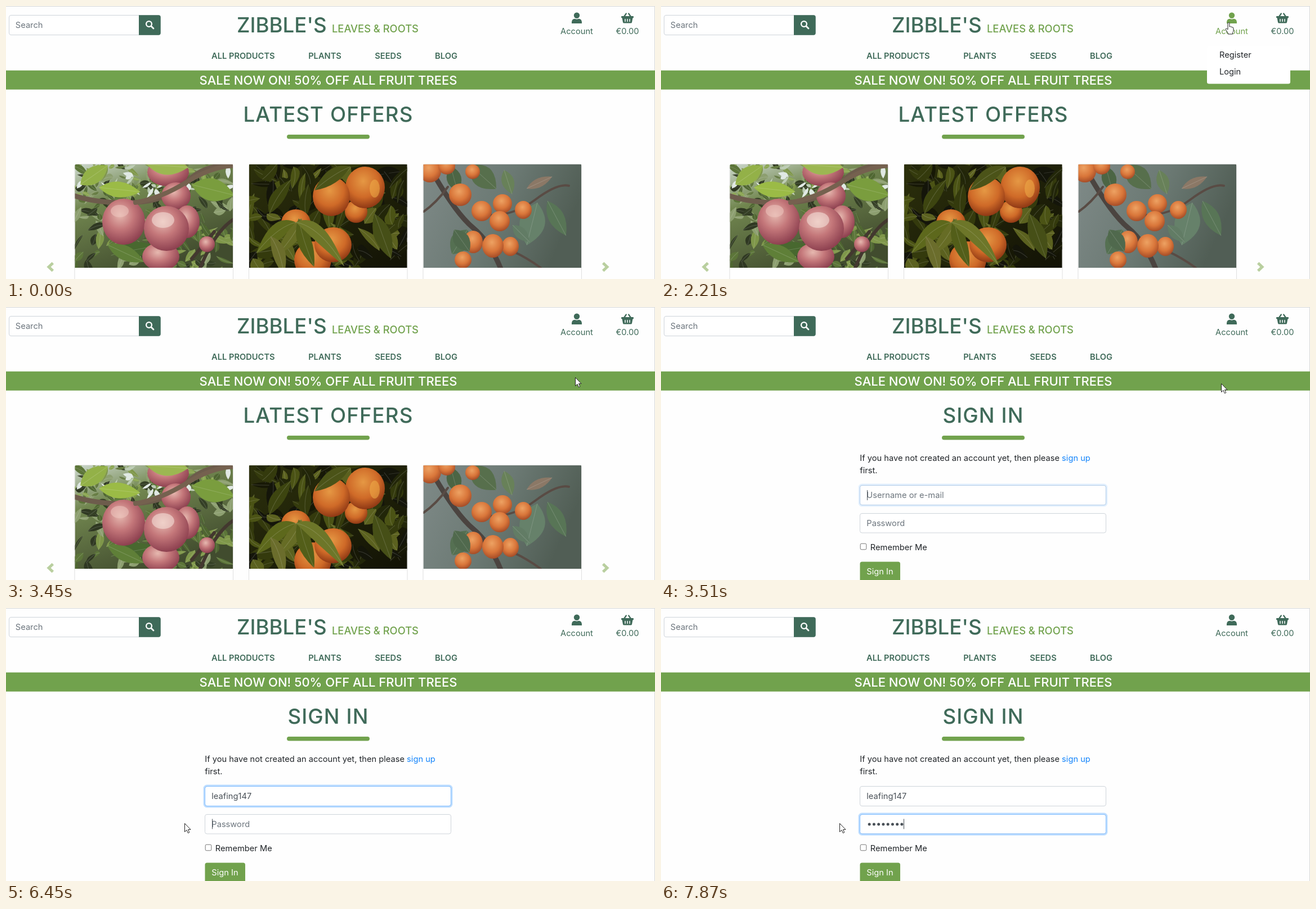
These frames come from a looping animation (1153 by 486 pixels, 8000 ms). An HTML page:

```html
<!DOCTYPE html>
<html lang="en">
<head>
<meta charset="utf-8">
<title>Shop sign in</title>
<style>
  html, body { margin: 0; width: 100%; height: 100%; overflow: hidden; background: #fefefe; }
  #stage { display: block; width: 1153px; height: 486px; font: 400 14.67px Inter, sans-serif; font-optical-sizing: none; fill: #212529; }
  .dark { fill: #3f6a59; color: #3f6a59; }
  .green { fill: #71a24d; }
  .mid { text-anchor: middle; }
  .nav { font-weight: 600; }
  .head { font-weight: 500; }
  .title { font-size: 36.67px; letter-spacing: 1.1px; }
  .hint { fill: #6c757d; }
  .typed { fill: #495057; }
  .box { fill: #fff; stroke: #ced4da; }
  .glow { fill: none; stroke: #bfdeff; stroke-width: 3; }
  .card { fill: #fff; stroke: #dfdfdf; }
  .line { fill: none; stroke-linecap: round; }
</style>
</head>
<body>
<svg id="stage" viewBox="0 0 1153 486">
  <defs>
    <radialGradient id="plum" cx=".42" cy=".35" r=".7"><stop stop-color="#e6b9b0"/><stop offset=".45" stop-color="#c4777a"/><stop offset="1" stop-color="#86394a"/></radialGradient>
    <radialGradient id="peach" cx=".45" cy=".35" r=".7"><stop stop-color="#e59844"/><stop offset=".55" stop-color="#cf6a28"/><stop offset="1" stop-color="#832f11"/></radialGradient>
    <radialGradient id="apricot" cx=".45" cy=".35" r=".7"><stop stop-color="#eda263"/><stop offset=".55" stop-color="#d9763a"/><stop offset="1" stop-color="#9c4524"/></radialGradient>
    <linearGradient id="orchard" x2=".5" y2="1"><stop stop-color="#ccd8cc"/><stop offset=".35" stop-color="#71864f"/><stop offset="1" stop-color="#414c2e"/></linearGradient>
    <linearGradient id="night" x2="1" y2="1"><stop stop-color="#2c300c"/><stop offset="1" stop-color="#121205"/></linearGradient>
    <linearGradient id="mist" x2="1" y2=".3"><stop stop-color="#7f8a88"/><stop offset=".55" stop-color="#6b7973"/><stop offset="1" stop-color="#515e55"/></linearGradient>
  </defs>

  <path d="M0 .5H1152.5V486" fill="none" stroke="#d5d7d8"/>

  <!-- Header -->
  <rect class="box" x="5.5" y="16.5" width="269" height="35" rx="3.5"/>
  <path class="dark" d="M236 16.300H271Q274.700 16.300 274.700 20V48Q274.700 51.700 271 51.700H236Z"/>
  <g class="line" stroke="#fff" stroke-width="2.300"><circle cx="254" cy="32" r="4.900"/><path d="M258 36L262 40" stroke-width="2.800"/></g>
  <text class="hint" x="16.800" y="39.300">Search</text>
  <text class="dark head" x="410" y="47" font-size="36.670">ZIBBLE'S</text>
  <text class="green head" x="579" y="47" font-size="18.330">LEAVES &amp; ROOTS</text>
  <g id="account" class="dark" style="fill: currentColor">
    <circle cx="1014" cy="16.700" r="5.200"/>
    <path d="M1005 31Q1004.600 22.800 1010.500 22.800Q1014 24.400 1017.500 22.800Q1023.400 22.800 1023 31Z"/>
    <text class="mid" x="1014" y="49.500">Account</text>
  </g>
  <g class="dark">
    <path class="line" d="M1098 19L1101.800 13.500M1110 19L1106.200 13.500" stroke="#3f6a59" stroke-width="2.200"/>
    <rect x="1093" y="18" width="22" height="3.200" rx="1.200"/>
    <path d="M1094.500 21H1113.500L1112 29Q1111.700 30.500 1110 30.500H1098Q1096.300 30.500 1096 29Z"/>
    <path class="line" d="M1100 23.500V27.500M1104 23.500V27.500M1108 23.500V27.500" stroke="#fefefe" stroke-width="1.500"/>
    <text class="mid" x="1104" y="49.500">€0.00</text>
  </g>
  <g class="dark mid nav">
    <text x="421.300" y="94">ALL PRODUCTS</text><text x="566.500" y="94">PLANTS</text>
    <text x="679" y="94">SEEDS</text><text x="782" y="94">BLOG</text>
  </g>
  <rect class="green" y="114.700" width="1153" height="34"/>
  <text class="mid head" x="572.500" y="139.500" font-size="22" fill="#fff">SALE NOW ON! 50% OFF ALL FRUIT TREES</text>
  <rect class="green" x="499" y="229" width="147" height="7.400" rx="3.700"/>

  <g id="offers">
    <text class="title head dark mid" x="572.500" y="206">LATEST OFFERS</text>
    <g id="cards"></g>
    <path d="M83.300 457.500L76 464.500L83.300 471.500M1060.700 457.500L1068 464.500L1060.700 471.500" fill="none" stroke="#b9cf9f" stroke-width="5"/>
  </g>

  <g id="signin">
    <text class="title head dark mid" x="572.500" y="206">SIGN IN</text>
    <text x="353.300" y="274.300">If you have not created an account yet, then please <tspan fill="#1384fb">sign up</tspan></text>
    <text x="353.300" y="296.300">first.</text>
    <rect class="box" x="353.500" y="317.500" width="437" height="35" rx="3.500"/>
    <rect class="box" x="353.500" y="367.500" width="437" height="34.500" rx="3.500"/>
    <g id="userFocus"><rect class="glow" x="352" y="316" width="440" height="38" rx="5"/><rect class="line" x="353.500" y="317.500" width="437" height="35" rx="3.500" stroke="#80bdff"/></g>
    <g id="passFocus"><rect class="glow" x="352" y="366" width="440" height="37.500" rx="5"/><rect class="line" x="353.500" y="367.500" width="437" height="34.500" rx="3.500" stroke="#80bdff"/></g>
    <text id="userHint" class="hint" x="365.300" y="340.300">Username or e-mail</text>
    <text id="passHint" class="hint" x="365.300" y="389.800">Password</text>
    <text id="user" class="typed" x="365.300" y="340.300"></text>
    <g id="dots" class="typed"></g>
    <rect id="userCaret" class="typed" y="326" width="1" height="18"/>
    <rect id="passCaret" class="typed" y="375.500" width="1" height="18"/>
    <rect x="354.200" y="421.200" width="10.600" height="10.600" rx="2" fill="#fff" stroke="#767676"/>
    <text x="371.800" y="432.800">Remember Me</text>
    <rect class="green" x="353.500" y="453.500" width="71.500" height="36" rx="3.700"/>
    <text x="365.300" y="476.300" fill="#fff">Sign In</text>
  </g>

  <g id="menu">
    <rect x="970" y="72" width="148" height="66.500" rx="3.500" fill="#fff"/>
    <text x="992" y="92">Register</text><text x="992" y="121.700">Login</text>
    <g id="pressed"><rect x="970" y="102" width="148" height="29.500" fill="#007bff"/><text x="992" y="121.700" fill="#fff">Login</text></g>
  </g>

  <g id="cursor" fill="#fff" stroke="#222" stroke-linejoin="round">
    <path id="arrow" d="M.5 .5V15.500L4 12.300L6.400 17.700L8.800 16.600L6.500 11.400H11Z"/>
    <path id="hand" d="M-2 13V2Q-2 .5 -.5 .5T1 2V8Q2.500 6.500 3.500 8.300Q5.200 7.300 5.900 9Q8 8.500 8 11V14.500Q8 17 6.500 18.500V21H-1.500V19.500L-5.500 13.500Q-6.500 11.500 -4.800 11Q-3.500 11 -2 13Z"/>
  </g>
</svg>
<script>
const LOOP = 8000;
const $ = id => document.getElementById(id);

// Each value stays until the next time in the list.
function hold(el, prop, steps) {
  const frames = steps.map(([t, value]) => ({ offset: t / LOOP, [prop]: value, easing: 'steps(1)' }));
  frames.push({ ...frames.at(-1), offset: 1 });
  el.animate(frames, { duration: LOOP, iterations: Infinity });
}
const show = (id, on, off = LOOP) => hold($(id), 'opacity', [[0, 0], [on, 1], [off, 0]].filter(s => s[0] < LOOP));
const shift = (x, y) => `translate(${x}px, ${y}px)`;

// Pictures on the cards
function random(seed) {
  return () => (seed = seed * 16807 % 2147483647) / 2147483647;
}
const leaf = (x, y, len, w, angle, color, bend = 0) =>
  `<g transform="translate(${x} ${y}) rotate(${angle})"><path d="M0 0Q${len * .45} ${-w} ${len} ${bend}Q${len * .45} ${w} 0 0Z" fill="${color}"/>
   <path d="M0 0Q${len * .45} 0 ${len} ${bend}" fill="none" stroke="#fff" stroke-opacity=".16"/></g>`;
const fruit = (kind, list) => list.map(([x, y, rx, ry = rx]) =>
  `<ellipse cx="${x}" cy="${y}" rx="${rx}" ry="${ry}" fill="url(#${kind})"/>`).join('');
const shine = (x, y, rx, ry, color) => `<ellipse cx="${x}" cy="${y}" rx="${rx}" ry="${ry}" fill="${color}" opacity=".55"/>`;
const branch = (d, width, color) => `<path class="line" d="${d}" stroke="${color}" stroke-width="${width}"/>`;
function scatter(seed, count, left, height, size, colors) {
  const rnd = random(seed);
  return Array.from({ length: count }, () => leaf(left - 10 + rnd() * 290, 280 + rnd() * height,
    size * (.5 + rnd()), size * (.2 + rnd() * .4), rnd() * 360, colors[Math.floor(rnd() * colors.length)], size * (rnd() - .5))).join('');
}
const card = (x, sky, art) =>
  `<rect class="card" x="${x - .5}" y="281.500" width="281.500" height="220" rx="3.500"/>
   <svg x="${x}" y="282" width="280.500" height="184" viewBox="${x} 282 280.500 184">
   <rect x="${x}" y="282" width="281" height="184" fill="url(#${sky})"/>${art}</svg>`;

const plums = scatter(71, 190, 122, 190, 25, ['#4f6631', '#7f974a', '#343f25', '#8d9f70', '#5c7539', '#2f3822'])
  + scatter(5, 60, 122, 60, 16, ['#dfe8e2', '#b9c9b0', '#8aa552', '#5d7438'])
  + branch('M122 338Q165 352 225 350T320 314T404 284', 9, '#6d5c4c')
  + branch('M404 380Q372 400 345 466M370 402L330 450', 6, '#43382f')
  + leaf(132, 318, 60, 30, -35, '#93b148') + leaf(165, 323, 74, 28, 6, '#9bbb46')
  + leaf(330, 318, 78, 40, 14, '#7a9d3e') + leaf(195, 440, 70, 28, -10, '#48682f') + leaf(180, 425, 72, 26, 25, '#5f7f38')
  + fruit('plum', [[288, 296, 37, 25], [302, 338, 26, 24], [275, 446, 33, 25], [322, 384, 22, 29], [357, 424, 14], [209, 384, 38, 41], [285, 396, 40]])
  + shine(279, 381, 20, 14, '#f8e6df') + shine(202, 365, 16, 11, '#eec6bf')
  + branch('M230 350Q275 342 320 314T404 284', 8, '#75614f') + leaf(250, 282, 74, 32, 4, '#9cb752');

const peaches = scatter(19, 120, 432, 190, 44, ['#343a0d', '#4b5315', '#222609', '#5b611f', '#171806', '#14150a'])
  + fruit('peach', [[545, 452, 33], [581, 425, 33, 31], [515, 386, 26, 24], [622, 366, 20], [638, 323, 35, 37], [578, 339, 33, 35]])
  + shine(655, 325, 9, 16, '#f0b04a')
  + leaf(515, 385, 82, 30, 165, '#5d681c', -35) + leaf(525, 378, 75, 24, 110, '#666c25', 18)
  + leaf(520, 378, 90, 25, 80, '#535e19', -12) + leaf(515, 385, 98, 30, 10, '#6d7629', 62)
  + leaf(470, 410, 70, 24, 55, '#6b6d2c', 20) + leaf(612, 286, 75, 25, 158, '#4b5318', -15)
  + leaf(655, 370, 85, 30, 70, '#464f17') + leaf(468, 370, 70, 24, -70, '#3d4510', 15);

const apricots = branch('M760 300Q800 370 830 395T880 470', 9, '#4b4440')
  + branch('M742 366Q765 350 785 322M855 372Q900 375 940 345T1000 320M860 425Q900 430 950 466', 4, '#594b44')
  + leaf(825, 284, 62, 38, 42, '#576f4c') + leaf(885, 292, 45, 22, 72, '#688159') + leaf(790, 285, 48, 26, 75, '#4c6544')
  + leaf(944, 350, 78, 45, 104, '#66816a') + leaf(962, 347, 70, 28, 62, '#587556') + leaf(820, 398, 52, 34, 122, '#557052')
  + leaf(925, 325, 50, 16, -25, '#8b7866') + leaf(900, 390, 42, 20, 45, '#627c65')
  + fruit('apricot', [[753, 294, 20], [783, 285, 15], [829, 295, 13], [807, 336, 20], [845, 365, 18], [882, 352, 17], [919, 363, 15, 16],
    [877, 383, 18], [830, 420, 17, 20], [896, 428, 15, 17], [865, 427, 19, 21], [812, 452, 15]])
  + leaf(796, 398, 48, 28, 55, '#50694d');

$('cards').innerHTML = card(122.5, 'orchard', plums) + card(432, 'night', peaches) + card(741.5, 'mist', apricots);

// Page and menu
hold($('offers'), 'opacity', [[0, 1], [3510, 0]]);
show('signin', 3510);
show('menu', 1750, 3300);
show('pressed', 3090, 3160);
hold($('account'), 'color', [[0, '#3f6a59'], [1060, '#71a24d'], [2480, '#3f6a59']]);

// Pointer: stepped travel along quadratic curves
function travel(start, end, count, [x0, y0], [cx, cy], [x1, y1]) {
  return Array.from({ length: count }, (_, i) => {
    const p = i / (count - 1), u = p * p * (3 - 2 * p), v = 1 - u;
    return [start + p * (end - start), v * v * x0 + 2 * u * v * cx + u * u * x1, v * v * y0 + 2 * u * v * cy + u * u * y1];
  });
}
const route = [
  ...travel(330, 1120, 13, [1091, 470], [855, 230], [997, 30]),
  ...travel(1190, 1330, 3, [999, 30], [1005, 29], [1009, 29]),
  ...travel(2210, 2960, 12, [1009, 29], [1020, 75], [1012, 117]),
  [3300, 1012, 118], [3370, 1012, 121], [3450, 1011, 125],
  ...travel(3510, 4060, 9, [995, 136], [640, 240], [327, 375]),
  [4140, 320, 380], [4200, 317, 383]
];
const onLink = ([t, , y]) => y < 55 || (y > 75 && y < 132 && t > 2000 && t < 3300);
hold($('cursor'), 'transform', [[0, shift(1091, 500)], ...route.map(([t, x, y]) => [t, shift(x, y)])]);
hold($('cursor'), 'opacity', [[0, 0], [330, 1]]);
hold($('hand'), 'opacity', [[0, 0], ...route.map(s => [s[0], +onLink(s)])]);
hold($('arrow'), 'opacity', [[0, 1], ...route.map(s => [s[0], +!onLink(s)])]);

// Typing
const name = 'leafing147';
const nameTimes = [4730, 4790, 4980, 5110, 5380, 5445, 5510, 5850, 5850, 6080];
const dotTimes = [7000, 7050, 7250, 7320, 7520, 7590, 7800, 7870];
const DOT = 8.25, LEFT = 366;

$('user').innerHTML = [...name].map(c => `<tspan>${c}</tspan>`).join('');
[...$('user').children].forEach((el, i) => hold(el, 'visibility', [[0, 'hidden'], [nameTimes[i], 'visible']]));
$('dots').innerHTML = dotTimes.map((_, i) => `<circle cx="${LEFT + (i + .5) * DOT}" cy="385" r="2.500"/>`).join('');
[...$('dots').children].forEach((el, i) => hold(el, 'opacity', [[0, 0], [dotTimes[i], 1]]));

const nameEnd = n => Math.round(365.3 + $('user').getSubStringLength(0, n));
hold($('userCaret'), 'transform', [[0, shift(LEFT, 0)], ...nameTimes.map((t, i) => [t, shift(nameEnd(i + 1), 0)])]);
hold($('passCaret'), 'transform', [[0, shift(LEFT, 0)], ...dotTimes.map((t, i) => [t, shift(Math.floor(LEFT + (i + 1) * DOT) - 1, 0)])]);
hold($('userCaret'), 'opacity', [[0, 1], [4530, 0], [4730, 1], [6450, 0]]);
show('passCaret', 6450);
hold($('userHint'), 'opacity', [[0, 1], [4730, 0]]);
hold($('passHint'), 'opacity', [[0, 1], [7000, 0]]);
hold($('userFocus'), 'opacity', [[0, .4], [3580, 1], [6520, .4], [6590, 0]]);
hold($('passFocus'), 'opacity', [[0, 0], [6520, .5], [6590, 1]]);
</script>
</body>
</html>
```
